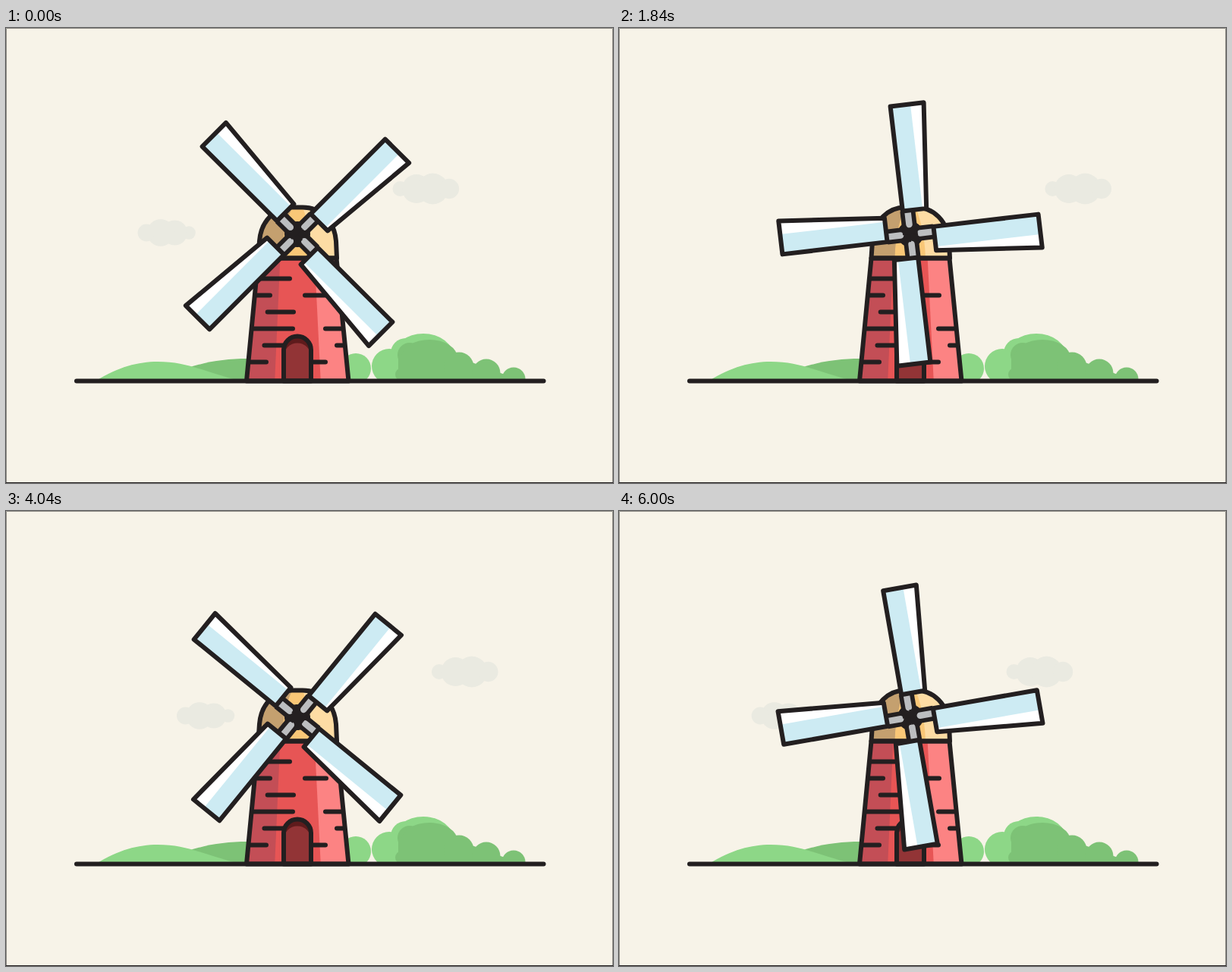
Write an HTML page that moves like this. It is 800 px wide and 600 px high and loops after 6.04 s.

```html
<!DOCTYPE html>
<html lang="en">
<head>
<meta charset="utf-8">
<title>Windmill</title>
<style>
  html, body { margin: 0; width: 100%; height: 100%; overflow: hidden; background: #f7f3e8; }
  svg { display: block; width: 100vw; height: 100vh; }
  .line { fill: none; stroke: #231f20; stroke-width: 6; stroke-linecap: round; stroke-linejoin: round; }
  .cloud { fill: #eaeae1; }
  .light { fill: #8dd787; }
  .dark { fill: #7dc276; }
</style>
</head>
<body>
<svg viewBox="0 0 800 600">
  <defs>
    <path id="cap" d="M332.500 303.500 L334 281 C336 254 355 236.500 377 236.500 H391 C414 236.500 433 254 435 281 L436 303.500 Z"/>
    <path id="body" d="M332.500 303.500 H435.500 L451.500 465.500 H317 Z"/>
    <path id="door" d="M366 465.500 V424.500 A18 18 0 0 1 402 424.500 V465.500 Z"/>
    <clipPath id="inCap"><use href="#cap"/></clipPath>
    <clipPath id="inBody"><use href="#body"/></clipPath>
    <clipPath id="inDoor"><use href="#door"/></clipPath>
    <clipPath id="aboveGround"><rect width="800" height="465"/></clipPath>
    <g id="puff"/>
    <g id="arm">
      <path d="M0 0 V-31" stroke="#231f20" stroke-width="20"/>
      <path d="M0 -13 V-31" stroke="#bcbec0" stroke-width="8.500" stroke-linecap="round"/>
    </g>
    <g id="blade">
      <path d="M-6.500 -170.500 H37.800 L25 -31.400 H-6.500 Z" fill="#fff"/>
      <path d="M-6.500 -170.500 H20 V-31.400 H-6.500 Z" fill="#cdebf3"/>
      <path class="line" d="M-6.500 -170.500 H37.800 L25 -31.400 H-6.500 Z"/>
    </g>
  </defs>

  <rect width="800" height="600" fill="#f7f3e8"/>

  <g id="clouds" class="cloud">
    <use href="#puff" transform="translate(212 270) scale(-.87 .87)"/>
    <use href="#puff" transform="translate(553 212)"/>
  </g>

  <g clip-path="url(#aboveGround)">
    <path class="dark" d="M238 449 C262 440 290 436 318 436 H340 V465 H238 Z"/>
    <path class="light" d="M119 465 C148 447 174 440 200 440 C240 440 262 454 308 465 Z"/>
    <g id="backBush" class="light">
      <circle cx="527" cy="429" r="20"/>
      <ellipse cx="550" cy="434" rx="40" ry="31"/>
    </g>
    <g id="frontBush" class="dark">
      <circle cx="532" cy="431" r="16"/>
      <circle cx="522" cy="457" r="9"/>
      <ellipse cx="558" cy="435" rx="37" ry="24"/>
      <path d="M517 432 H590 L660 458 V465 H517 Z"/>
    </g>
  </g>

  <g clip-path="url(#inBody)">
    <path d="M310 300 H460 V470 H310 Z" fill="#e75555"/>
    <path d="M310 300 H361.500 L354 470 H310 Z" fill="#c34e56"/>
    <path d="M406.500 300 H460 V470 H415 Z" fill="#fc8383"/>
  </g>
  <g clip-path="url(#inCap)">
    <path d="M325 230 H445 V305 H325 Z" fill="#f9c777"/>
    <path d="M325 230 H380 Q364 262 363.500 305 H325 Z" fill="#c4a06f"/>
    <path d="M388 230 H445 V305 H404 Q403 262 388 230 Z" fill="#fddca4"/>
  </g>
  <path id="bricks" class="line"/>
  <path class="line" d="M394 352.500 H422 M421 396.500 H443 M436 418.500 H445 M403 440.500 H421"/>
  <g clip-path="url(#inDoor)">
    <use href="#door" fill="#5e1b1c"/>
    <use href="#door" y="9" fill="#923436"/>
  </g>
  <use href="#door" class="line"/>
  <use href="#body" class="line"/>
  <use href="#cap" class="line"/>
  <path class="line" d="M93 465.500 H708.500"/>

  <g transform="translate(384 272)">
    <g id="sails"><circle r="17" fill="#231f20"/></g>
  </g>

  <path d="M.5 600 V.5 H799.500 V600" fill="none" stroke="#8f8c86"/>
  <path d="M0 599.500 H800" stroke="#231f20"/>
</svg>
<script>
  const LOOP = 6040, STEP = 40;
  const FROM = 44.9, SWEEP = 126;   // sail angle, degrees per loop
  const TURN = 2880, DRIFT = 81.2;  // when and where the clouds turn back

  const $ = id => document.getElementById(id);

  function add(parent, tag, attrs) {
    const el = document.createElementNS("http://www.w3.org/2000/svg", tag);
    for (const key in attrs) el.setAttribute(key, attrs[key]);
    parent.appendChild(el);
  }

  // A row of round lobes; rule(i) gives [x, y, radius].
  function lobes(id, count, rule) {
    for (let i = 0; i < count; i++) {
      const [cx, cy, r] = rule(i);
      add($(id), "circle", { cx, cy, r });
    }
  }

  lobes("puff", 4, i => [21.5 * i - 33.5, 0, 10 + 11 * Math.sin(0.95 * i)]);
  lobes("backBush", 2, i => [461 + 44 * i, 449 - 3 * i, 20 + 3 * i]);
  lobes("frontBush", 3, i => [597 + 36 * i, 447 + 8 * i, 19.5 - i * i]);

  // Left-hand mortar lines start at the sloping wall; some are set in from it.
  const bricks = [374, 348, 379, 378, 366, 343].map((end, i) => {
    const y = 330.5 + 22 * i;
    const wall = 332.5 - (y - 303.5) * 0.096;
    const inset = i && i % 2 === 0 ? 19 : 1;
    return `M${wall + inset} ${y} H${end}`;
  });
  $("bricks").setAttribute("d", bricks.join(" "));

  for (const href of ["#arm", "#blade"])
    for (let a = 0; a < 360; a += 90)
      add($("sails"), "use", { href, transform: `rotate(${a})` });

  function draw(t) {
    const x = t < TURN ? t / TURN : (LOOP - t) / (LOOP - TURN);
    $("clouds").setAttribute("transform", `translate(${x * DRIFT})`);
    $("sails").setAttribute("transform", `rotate(${FROM + SWEEP * t / LOOP})`);
  }

  const start = performance.now();
  function tick() {
    const t = (performance.now() - start) % LOOP;
    draw(Math.floor(t / STEP) * STEP);
    requestAnimationFrame(tick);
  }
  tick();
</script>
</body>
</html>
```
